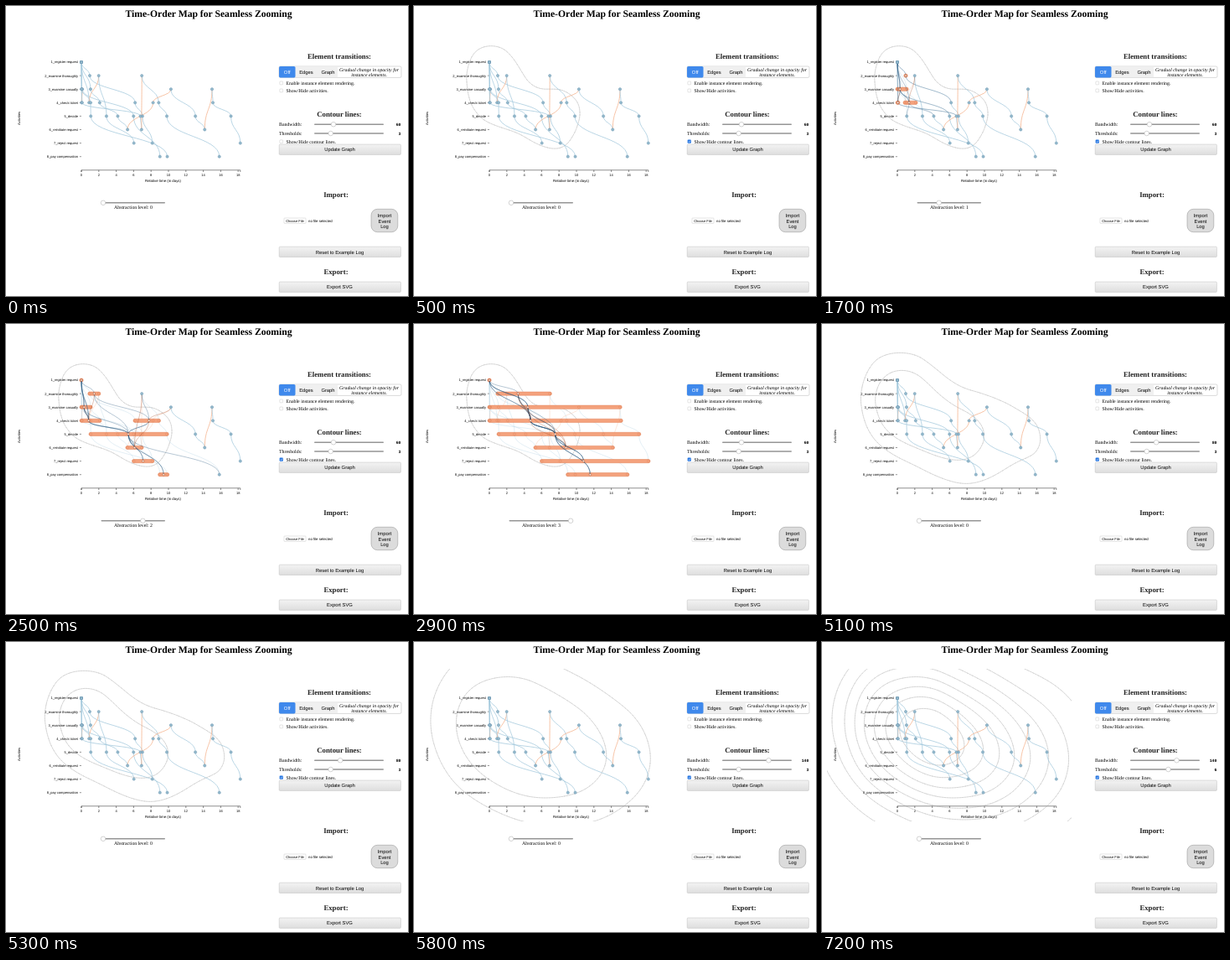
An HTML page that plays this animation: 480x346 px, repeating every 8000 ms.

```html
<!DOCTYPE html>
<html lang="en">
<head>
<meta charset="utf-8">
<title>Time-Order Map</title>
<style>
html, body { margin: 0; width: 100%; height: 100%; overflow: hidden; background: #fff; }
svg { display: block; width: 480px; height: 346px; }
text { font: 5.84px "Liberation Serif", serif; text-rendering: geometricPrecision; }
.sans { font: 5.84px "Liberation Sans", sans-serif; }
.axis { font: 4.05px "Liberation Sans", sans-serif; }
.mono { font: bold 4.9px "Liberation Mono", monospace; text-anchor: end; }
.head { font-weight: bold; font-size: 8.76px; fill: #222; }
.slant { font-style: italic; text-anchor: middle; }
.mid { text-anchor: middle; }
.end { text-anchor: end; }
.knob { fill: #fff; stroke: #aaa; stroke-width: .5; }
.box { fill: #fff; stroke: #bbb; stroke-width: .4; }
.edge { fill: none; stroke-width: .75; }
.fwd { stroke: #a3c8dd; }
.back { stroke: #f4b08a; }
.faint { opacity: .5; stroke-width: .6; }
.sum { fill: none; stroke-width: .65; opacity: .5; }
.sum.fwd { stroke: #24557c; }
.sum.back { stroke: #a5481f; }
.node { fill: #94bacd; stroke: #628fa9; stroke-width: .4; }
.bar { fill: #f4a27d; stroke: #e07f55; stroke-width: .5; }
.dot { fill: none; stroke: #dd8158; stroke-width: .35; }
.hub { fill: #fbe6da; stroke: #a3512e; stroke-width: .5; }
</style>
</head>
<body>
<svg viewBox="0 0 480 346">
  <defs>
    <clipPath id="plot"><rect x="6" y="32" width="292" height="182"/></clipPath>
    <linearGradient id="face" x2="0" y2="1"><stop stop-color="#f3f3f3"/><stop offset="1" stop-color="#dedede"/></linearGradient>
  </defs>
  <g id="fixed"></g>
  <path id="contour" clip-path="url(#plot)" fill="none" stroke="#a6a6a6" stroke-width=".37" stroke-linecap="round"/>
  <g id="graph"></g>
  <g id="controls"></g>
</svg>
<script>
const $ = id => document.getElementById(id);
const LOOP = 8000, SCALE = .365;
const px = day => 90 + day * 10.4;
const py = row => 67 + row * 16.1;

const activities = ['register request', 'examine thoroughly', 'examine casually', 'check ticket',
  'decide', 'reinitiate request', 'reject request', 'pay compensation'];

// Each case: activity rows in order, and the days since its start
const cases = [
  ['01346', [0, .96, 6.17, 7.01, 8.14]],
  ['03247', [0, .03, .11, 5.99, 9.02]],
  ['023451347', [0, .02, .08, 6.78, 6.91, 6.94, 8.88, 9.81, 15.84]],
  ['03146', [0, .88, 1.99, 2.88, 6.03]],
  ['0234532452346', [0, 1.05, 2.1, 4.18, 5.3, 8.23, 10.28, 13.09, 14.16, 15, 15.1, 17.17, 18.25]],
  ['02347', [0, .04, 1.06, 1.08, 9.86]]
].map(([rows, days]) => days.map((day, i) => ({ row: +rows[i], x: px(day), y: py(+rows[i]), day })));
const events = cases.flat();

// Day ranges merged into one bar, by abstraction level and row
const merges = [
  [],
  [[], [[.9, 1]], [[0, 1.1]], [[0, .1], [.8, 2.2]]],
  [[[0, 1]], [[.9, 2]], [[0, 1.1]], [[0, 2.2], [6, 9]], [[1, 10]], [[5, 7]], [[6, 9]], [[9, 10]]],
  activities.map(() => [[0, 19]])
];

const text = (s, x, y, cls = '', extra = '') => `<text x="${x}" y="${y}" class="${cls}" ${extra}>${s}</text>`;
const rect = (x, y, w, h, r, attrs) => `<rect x="${x}" y="${y}" width="${w}" height="${h}" rx="${r}" ${attrs}/>`;
const circle = (x, y, r, cls) => `<circle cx="${x}" cy="${y}" r="${r}" class="${cls}"/>`;
const button = (s, y) => rect(326.2, y, 145.2, 12.3, 1, 'fill="url(#face)" stroke="#bcbcbc" stroke-width=".5"') +
  text(s, 398.5, y + 8.3, 'sans mid');
const checkbox = y => rect(326.8, y, 3.8, 3.8, .7, 'class="box"');
const slider = (x, y, w, knob) => rect(x, y - .75, w, 1.5, .75, 'fill="#959595"') + circle(knob, y, 2.8, 'knob');

function drawFixed() {
  let s = text('Time-Order Map for Seamless Zooming', 242, 13, 'mid', 'style="font-size:11.65px;font-weight:bold"');
  activities.forEach((name, i) => {
    s += text(`${i + 1}_${name}`, 86, py(i) + 1.4, 'axis end');
    s += `<path d="M87.8 ${py(i)}H90" stroke="#000" stroke-width=".4"/>`;
  });
  let ticks = 'M90 198V195.8H279.8V198';
  for (let d = 0; d <= 18; d += 2) {
    ticks += `M${px(d)} 195.8v2.2`;
    s += text(d, px(d), 202.6, 'axis mid');
  }
  s += `<path d="${ticks}" fill="none" stroke="#000" stroke-width=".45"/>`;
  s += text('Relative time (in days)', 187.5, 210.4, 'axis mid', 'style="font-size:4.35px"');
  s += text('Activities', 0, 0, 'axis mid', 'transform="translate(17.2 134)rotate(-90)"');

  s += text('Element transitions:', 398, 62.5, 'head mid');
  s += rect(326, 72, 146, 13.4, 1.6, 'fill="#fff" stroke="#b5b5b5" stroke-width=".5"');
  s += rect(345, 72.3, 51, 12.8, 0, 'fill="#f0f0f0"') + rect(326, 72, 19.5, 13.4, 1.6, 'fill="#3f89ec"');
  s += text('Off', 335.7, 80.6, 'sans mid', 'fill="#fff"') + text('Edges', 358.5, 80.6, 'sans mid') + text('Graph', 384.5, 80.6, 'sans mid');
  s += text('Gradual change in opacity for', 433.5, 77.5, 'slant') + text('instance elements.', 433.5, 83.8, 'slant');
  s += checkbox(90) + text('Enable instance element rendering.', 334.5, 93.6);
  s += checkbox(99) + text('Show/Hide activities.', 334.5, 102.7);

  s += text('Contour lines:', 398, 131.5, 'head mid');
  s += text('Bandwidth:', 326, 143) + text('Thresholds:', 326, 154);
  s += text('Show/Hide contour lines.', 334.5, 163.6) + button('Update Graph', 165.1);

  s += text('Import:', 394, 227.5, 'head mid');
  s += rect(332, 253, 26, 6.4, .8, 'class="box"') + text('Choose File', 345, 257.7, 'axis mid');
  s += text('no file selected', 361, 257.7, 'axis', 'style="font-size:4.3px"');
  s += rect(436, 242.3, 31.8, 27.4, 7.5, 'fill="#dcdcdc" stroke="#8f8f8f" stroke-width=".5"');
  ['Import', 'Event', 'Log'].forEach((w, i) => s += text(w, 452, 252.2 + i * 6.5, 'sans mid'));
  s += button('Reset to Example Log', 287.2);
  s += text('Export:', 394, 319.8, 'head mid') + button('Export SVG', 329.1);
  $('fixed').innerHTML = s;
}

// Three box blurs in a row make a quadratic spline
const spline = u => (u = Math.abs(u)) < .5 ? .75 - u * u : u < 1.5 ? (1.5 - u) ** 2 / 2 : 0;

// Iso-lines of the blurred event density, by marching squares
function contourPath(bandwidth, step, count) {
  const cell = 3, cols = 100, rows = 64, x0 = 3, y0 = 28;
  const box = 8 * Math.floor(bandwidth / 4) + 4, width = box * SCALE;
  const grid = Array.from({ length: rows }, (_, j) => Array.from({ length: cols }, (_, i) =>
    events.reduce((sum, e) => sum + spline((x0 + i * cell - e.x) / width) * spline((y0 + j * cell - e.y) / width), 0)));
  let d = '';
  for (let k = 1; k <= count; k++) {
    const level = k * step * box ** 2;
    for (let j = 0; j < rows - 1; j++) for (let i = 0; i < cols - 1; i++) {
      const corners = [[i, j], [i + 1, j], [i + 1, j + 1], [i, j + 1]];
      const hits = [];
      corners.forEach(([ax, ay], n) => {
        const [bx, by] = corners[(n + 1) % 4];
        const a = grid[ay][ax], b = grid[by][bx];
        if (a < level === b < level) return;
        const f = (level - a) / (b - a);
        hits.push((x0 + cell * (ax + f * (bx - ax))).toFixed(2) + ' ' + (y0 + cell * (ay + f * (by - ay))).toFixed(2));
      });
      for (let n = 0; n + 1 < hits.length; n += 2) d += `M${hits[n]}L${hits[n + 1]}`;
    }
  }
  return d;
}

const link = (a, b, cls) => {
  const m = (a.y + b.y) / 2;
  return `<path class="${cls} ${b.y > a.y ? 'fwd' : 'back'}" d="M${a.x} ${a.y}C${a.x} ${m} ${b.x} ${m} ${b.x} ${b.y}"/>`;
};

function graphMarkup(level) {
  const hubs = new Map();
  const bars = [];
  merges[level].forEach((ranges, row) => ranges.forEach(([lo, hi]) => {
    const group = events.filter(e => e.row === row && e.day >= lo && e.day <= hi);
    const xs = group.map(e => e.x);
    const hub = { x: xs.reduce((a, b) => a + b) / xs.length, y: py(row) };
    group.forEach(e => hubs.set(e, hub));
    bars.push({ hub, group, x: Math.min(...xs) - 2.2, w: Math.max(...xs) - Math.min(...xs) + 4.4 });
  }));
  let edges = '', sums = '', nodes = '';
  cases.forEach(list => list.slice(1).forEach((b, i) => {
    const a = list[i], merged = hubs.has(a) || hubs.has(b);
    edges += link(a, b, merged ? 'edge faint' : 'edge');
    if (merged) sums += link(hubs.get(a) || a, hubs.get(b) || b, 'sum');
  }));
  events.forEach(e => { if (!hubs.has(e)) nodes += circle(e.x, e.y, 1.65, 'node'); });
  const barShapes = bars.map(b => rect(b.x, b.hub.y - 2.1, b.w, 4.2, 2, 'class="bar"') +
    b.group.map(e => circle(e.x, e.y, 1.5, 'dot')).join('')).join('');
  return edges + barShapes + sums + nodes + bars.map(b => circle(b.hub.x, b.hub.y, 1.3, 'hub')).join('');
}

function controlMarkup({ level, bandwidth, thresholds, shown }) {
  const check = shown
    ? rect(326.6, 159.6, 4.2, 4.2, .8, 'fill="#2374e1"') + '<path d="M327.6 161.8l.9 .9 1.4-2" fill="none" stroke="#fff" stroke-width=".6"/>'
    : checkbox(159.8);
  return slider(113.5, 234.8, 76.5, 116 + level * 23.7) + text('Abstraction level: ' + level, 152, 242, 'mid') +
    slider(368, 141.2, 83, 391 + (bandwidth - 60) * .406) + text(bandwidth, 471.5, 143, 'mono') +
    slider(368, 152, 83, 387.7 + (thresholds - 3) * 8.6) + text(thresholds, 471.5, 153.8, 'mono') + check;
}

// Value of the last [time, value] pair reached
const at = (t, ...keys) => keys.filter(k => k[0] <= t).pop()[1];

const contours = [
  [60, 2e-4, 1], [80, 1e-4, 2], [130, 5e-5, 3], [140, 5e-5, 2], [140, 2e-5, 8]
].map(args => contourPath(...args));
const graphs = merges.map((_, level) => graphMarkup(level));

let last = '';
function frame(now) {
  const t = now % LOOP;
  const state = {
    level: at(t, [0, 0], [1700, 1], [2000, 2], [2800, 3], [3300, 0]),
    bandwidth: at(t, [0, 60], [5100, 80], [5500, 130], [5800, 140]),
    thresholds: at(t, [0, 3], [6700, 5], [6800, 6]),
    shown: t >= 200,
    contour: at(t, [0, 0], [5100, 1], [5500, 2], [5800, 3], [7200, 4]),
    fade: at(t, [0, 0], [200, .5], [300, 1])
  };
  const key = JSON.stringify(state);
  if (key !== last) {
    last = key;
    $('graph').innerHTML = graphs[state.level];
    $('controls').innerHTML = controlMarkup(state);
    $('contour').setAttribute('d', contours[state.contour]);
    $('contour').setAttribute('opacity', state.fade);
  }
  requestAnimationFrame(frame);
}

drawFixed();
frame(0);
</script>
</body>
</html>
```
